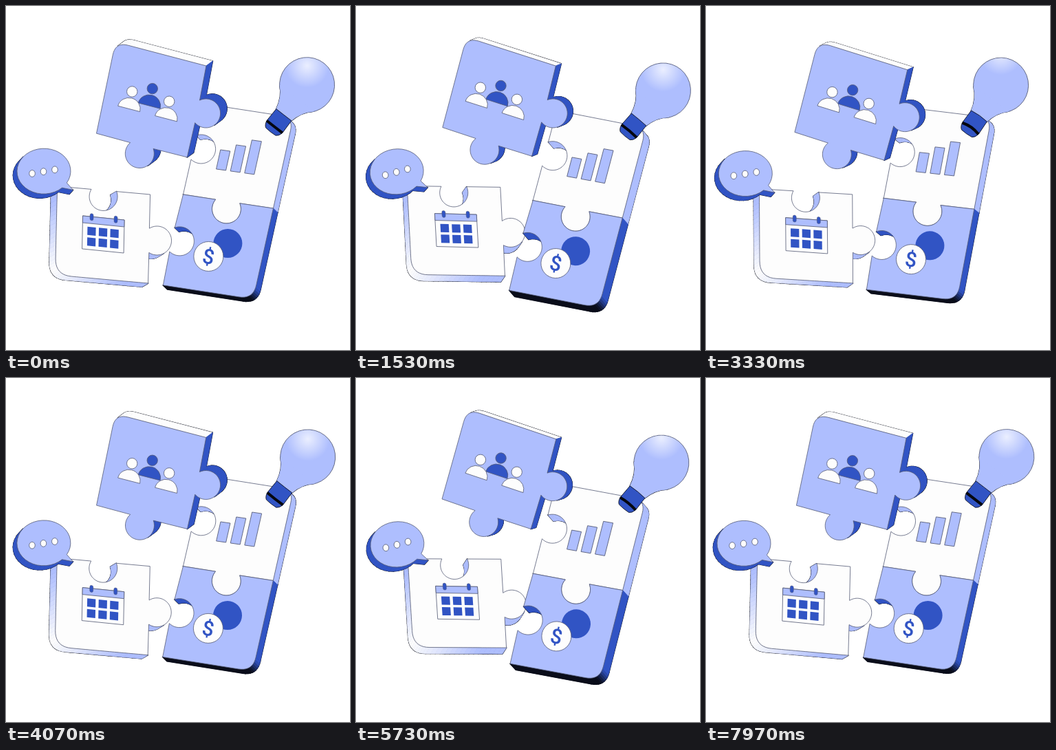
An HTML page with a canvas for the animation above (8010 ms loop, 500x500 px).

```html
<!DOCTYPE html>
<html lang="en">
<head>
<meta charset="utf-8">
<title>Puzzle pieces</title>
<style>
html, body { margin: 0; width: 100%; height: 100%; overflow: hidden; background: #fff; }
canvas { display: block; width: 500px; height: 500px; }
</style>
</head>
<body>
<canvas id="stage" width="500" height="500"></canvas>
<script>
const ctx = document.getElementById('stage').getContext('2d');
const PERIOD = 4005, RAD = Math.PI / 180;
const LIGHT = [174, 190, 254], DARK = [49, 84, 196], WHITE = [253, 253, 253], BLACK = [10, 13, 26];
const LINE = '#555b75', EDGE = '#10131f';

const rgb = c => `rgb(${c.map(Math.round).join()})`;
const mix = (a, b, t) => a.map((v, i) => v + (b[i] - v) * t);
const clamp = v => Math.max(0, Math.min(1, v));

// Everything sways on one cycle: mean value, amplitude, phase in degrees
const wave = (mean, amp = 0, phase = 0) => t =>
  mean + amp * Math.cos((t / PERIOD * 360 - phase) * RAD);

// A rigid piece turns about its pivot; (dx, dy) is the offset of its back face
function floating(pivot, { x, y, roll, dx, dy }) {
  return t => ({
    m: new DOMMatrix().translate(x(t), y(t)).rotate(roll(t)).translate(-pivot[0], -pivot[1]),
    e: [dx(t), dy(t)]
  });
}

const team = floating([211.5, 135.5], {
  x: wave(209.6, 1.7, -17), y: wave(134.8, 3.3, -67), roll: wave(2.7, 2.9, 214),
  dx: wave(8.2, 1.4, 34), dy: wave(-4, 3.5, 214)
});
const card = floating([322.5, 284], {
  x: wave(323, 1.2, -90), y: wave(290.5, 6.5, 180), roll: wave(0.5, 2.4, 100),
  dx: wave(7.3, 1, 180), dy: wave(7.3, 1.8, 135)
});
const plan = floating([140, 332.5], {
  x: wave(144.6, 5.2, 219), y: wave(330.5, 3.8, -59), roll: wave(-2.6, 2.65, 8),
  dx: wave(-7.3, 1.6, 180), dy: wave(7, 1.9, 165)
});
const talk = floating([55, 240], {
  x: wave(57.8, 3, 200), y: wave(241.7, 3.4, 243), roll: wave(-3.5, 3.2, -39),
  dx: wave(-5.5), dy: wave(6)
});
const bulb = { x: wave(438.5, 10.8, 95), y: wave(118.7, 4.4, 155), roll: wave(37.9, 3, 92) };
const bulbBow = wave(1, 2.2, 240), bulbShine = wave(-36, 19, 65);

// Outline helpers
function arc(cx, cy, rx, from, to, ry = rx) {
  const n = 36;
  return Array.from({ length: n + 1 }, (_, i) => {
    const a = (from + (to - from) * i / n) * RAD;
    return [cx + rx * Math.cos(a), cy + ry * Math.sin(a)];
  });
}
function corner(c, prev, next, r) {
  const toward = q => mix(c, q, r / Math.hypot(q[0] - c[0], q[1] - c[1]));
  const a = toward(prev), b = toward(next);
  return Array.from({ length: 11 }, (_, i) => mix(mix(a, c, i / 10), mix(c, b, i / 10), i / 10));
}
const steps = (a, b, n) => Array.from({ length: n }, (_, i) => mix(a, b, (i + 1) / n));

const teamShape = {
  fill: LIGHT,
  side: (n, p, i) => i <= 10 ? WHITE : DARK,
  pts: [
    ...corner([159, 52], [132, 185], [291, 86], 19), [291, 86],
    ...arc(291, 155, 21, -116, 139), [264, 219],
    ...arc(195, 214, 21, -20, 229), [132, 185]]
};
const chartShape = {
  fill: WHITE,
  side: () => LIGHT,
  pts: [
    [286, 142], ...corner([417, 162], [286, 142], [388, 294], 19), [388, 294],
    ...arc(320, 295, 21, -23, 221), [257, 274],
    ...arc(283, 208, 21, 134, -110)]
};
const moneyShape = {
  fill: LIGHT,
  side: (n, p) => p[1] > 395 ? mix(DARK, BLACK, clamp(n[1] * 1.6 - 0.5)) : DARK,
  pts: [
    [257, 274], ...arc(320, 295, 21, 221, -23), [388, 294],
    ...corner([359, 426], [388, 294], [228, 406], 21), [228, 406],
    ...arc(252, 342, 21, 134, -110)]
};
const bend = corner([71, 391], [206, 403], [74, 262], 24);
const planShape = {
  fill: WHITE,
  side: (n, p) => mix(LIGHT, WHITE, clamp(1 - Math.hypot(p[0] - 74, p[1] - 380) / 100)),
  pts: [
    [74, 262], ...arc(141, 277, 20.5, -149, -381), [209, 274],
    ...arc(219, 341, 21, -122, 124), [206, 403],
    ...steps([206, 403], bend[0], 16), ...bend, ...steps(bend[10], [74, 262], 16)]
};
const talkShape = {
  fill: LIGHT,
  side: () => DARK,
  pts: [...arc(55, 240, 39, 48, 392, 33), [97, 268]]
};

function trace(pts) {
  ctx.beginPath();
  pts.forEach(p => ctx.lineTo(p[0], p[1]));
  ctx.closePath();
}
function paint(fill, stroke, width = 0.8) {
  if (fill) { ctx.fillStyle = fill; ctx.fill(); }
  if (stroke) { ctx.strokeStyle = stroke; ctx.lineWidth = width; ctx.stroke(); }
}

// Draws the visible side walls, then the front faces
function slab({ m, e }, shapes) {
  const walls = [], fronts = [];
  for (const s of shapes) {
    const pts = s.pts.map(([x, y]) => [m.a * x + m.c * y + m.e, m.b * x + m.d * y + m.f]);
    fronts.push([pts, s]);
    pts.forEach((p, i) => {
      const j = (i + 1) % pts.length, q = pts[j];
      const dx = q[0] - p[0], dy = q[1] - p[1], len = Math.hypot(dx, dy);
      if (len < 0.01 || dy * e[0] - dx * e[1] <= 0) return;
      const col = rgb(s.side([dy / len, -dx / len], mix(s.pts[i], s.pts[j], 0.5), i));
      walls.push([[p, q, [q[0] + e[0], q[1] + e[1]], [p[0] + e[0], p[1] + e[1]]], col]);
    });
  }
  ctx.resetTransform();
  ctx.lineJoin = 'round';
  for (const [w] of walls) { trace(w); paint(null, EDGE, 1.7); }
  for (const [w, col] of walls) { trace(w); paint(col, col, 0.9); }
  for (const [p, s] of fronts) { trace(p); paint(rgb(s.fill), LINE); }
  ctx.setTransform(m);
}

function disc(x, y, rx, fill, stroke, ry = rx) {
  ctx.beginPath();
  ctx.ellipse(x, y, rx, ry, 0, 0, Math.PI * 2);
  paint(fill, stroke);
}
function box(x, y, w, h, fill, stroke) {
  ctx.beginPath();
  ctx.rect(x, y, w, h);
  paint(fill, stroke);
}
function person(x, y, fill) {
  ctx.beginPath();
  ctx.ellipse(x, y, 16.5, 16, 0.25, Math.PI, Math.PI * 2);
  ctx.closePath();
  paint(fill, LINE);
  disc(x + 4.5, y - 25, 7.7, fill, LINE);
}

function drawTeam(t) {
  slab(team(t), [teamShape]);
  person(208.5, 144.5, rgb(DARK));
  person(179, 149, rgb(WHITE));
  person(233, 163, rgb(WHITE));
}

function drawCard(t) {
  const pose = card(t);
  slab(pose, [chartShape, moneyShape]);
  ctx.transform(1, 0.14, -0.22, 1, 305, 237);
  for (let i = 0; i < 3; i++) {
    const h = 28 + 10 * i;
    box(20.6 * i, -h, 14, h, rgb(LIGHT), LINE);
  }
  ctx.setTransform(pose.m);
  disc(322, 345, 21, rgb(DARK));
  disc(294, 364, 21.5, rgb(WHITE), LINE);
  ctx.translate(294, 364);
  ctx.rotate(0.18);
  ctx.font = '500 30px Roboto, Inter, sans-serif';
  ctx.textAlign = 'center';
  ctx.fillStyle = rgb(DARK);
  ctx.fillText('$', 0, 10.7);
}

function drawPlan(t) {
  slab(plan(t), [planShape]);
  ctx.transform(1, 0.1, -0.02, 1, 111, 305);
  box(0, 0, 60.5, 48, rgb(WHITE), LINE);
  box(0, 0, 60.5, 10, rgb(LIGHT), LINE);
  for (const x of [13, 48]) {
    ctx.beginPath();
    ctx.roundRect(x - 2.5, -4.5, 5, 10, 2.5);
    paint(rgb(DARK), LINE, 0.5);
  }
  for (let i = 0; i < 6; i++) box(7.2 + i % 3 * 16.6, 15 + (i > 2) * 15.5, 12.2, 12, rgb(DARK));
}

function drawTalk(t) {
  slab(talk(t), [talkShape]);
  for (let i = -1; i < 2; i++) disc(54.5 + 16.5 * i, 240.5 - 2.5 * i, 4.3, rgb(WHITE), LINE, 4.9);
}

function neck() {
  ctx.beginPath();
  ctx.moveTo(32, 24);
  ctx.quadraticCurveTo(18, 36, 14, 56);
  ctx.lineTo(-14, 56);
  ctx.quadraticCurveTo(-18, 36, -32, 24);
}

function drawBulb(t) {
  const x = bulb.x(t), y = bulb.y(t), bow = bulbBow(t), shine = bulbShine(t);
  ctx.setTransform(new DOMMatrix().translate(x, y).rotate(bulb.roll(t)));
  neck();
  paint(null, EDGE, 1);
  disc(0, 0, 40, rgb(LIGHT), LINE);
  neck();
  paint(rgb(LIGHT));

  ctx.beginPath();
  ctx.moveTo(-14, 55);
  ctx.quadraticCurveTo(0, 55 - bow, 14, 55);
  ctx.lineTo(14.5, 77);
  ctx.quadraticCurveTo(13, 84, 9, 86);
  ctx.quadraticCurveTo(0, 87, -9, 86);
  ctx.quadraticCurveTo(-13, 84, -14.5, 77);
  ctx.closePath();
  paint(rgb(DARK), EDGE);
  ctx.beginPath();
  ctx.moveTo(-14.3, 77);
  ctx.quadraticCurveTo(0, 77 - 2 * bow, 14.3, 77);
  paint(null, '#05070f', 4);

  ctx.resetTransform();
  const glow = ctx.createRadialGradient(x, y + shine, 0, x, y + shine, 32);
  glow.addColorStop(0, 'rgba(255,255,255,.75)');
  glow.addColorStop(0.4, 'rgba(255,255,255,.45)');
  glow.addColorStop(1, 'rgba(255,255,255,0)');
  disc(x, y, 39.5, glow);
}

function draw(t) {
  ctx.resetTransform();
  ctx.fillStyle = '#fff';
  ctx.fillRect(0, 0, 500, 500);
  drawPlan(t);
  drawCard(t);
  drawTeam(t);
  drawTalk(t);
  drawBulb(t);
}

const start = performance.now();
function tick() {
  draw((performance.now() - start) % (PERIOD * 2));
  requestAnimationFrame(tick);
}
tick();
</script>
</body>
</html>
```
